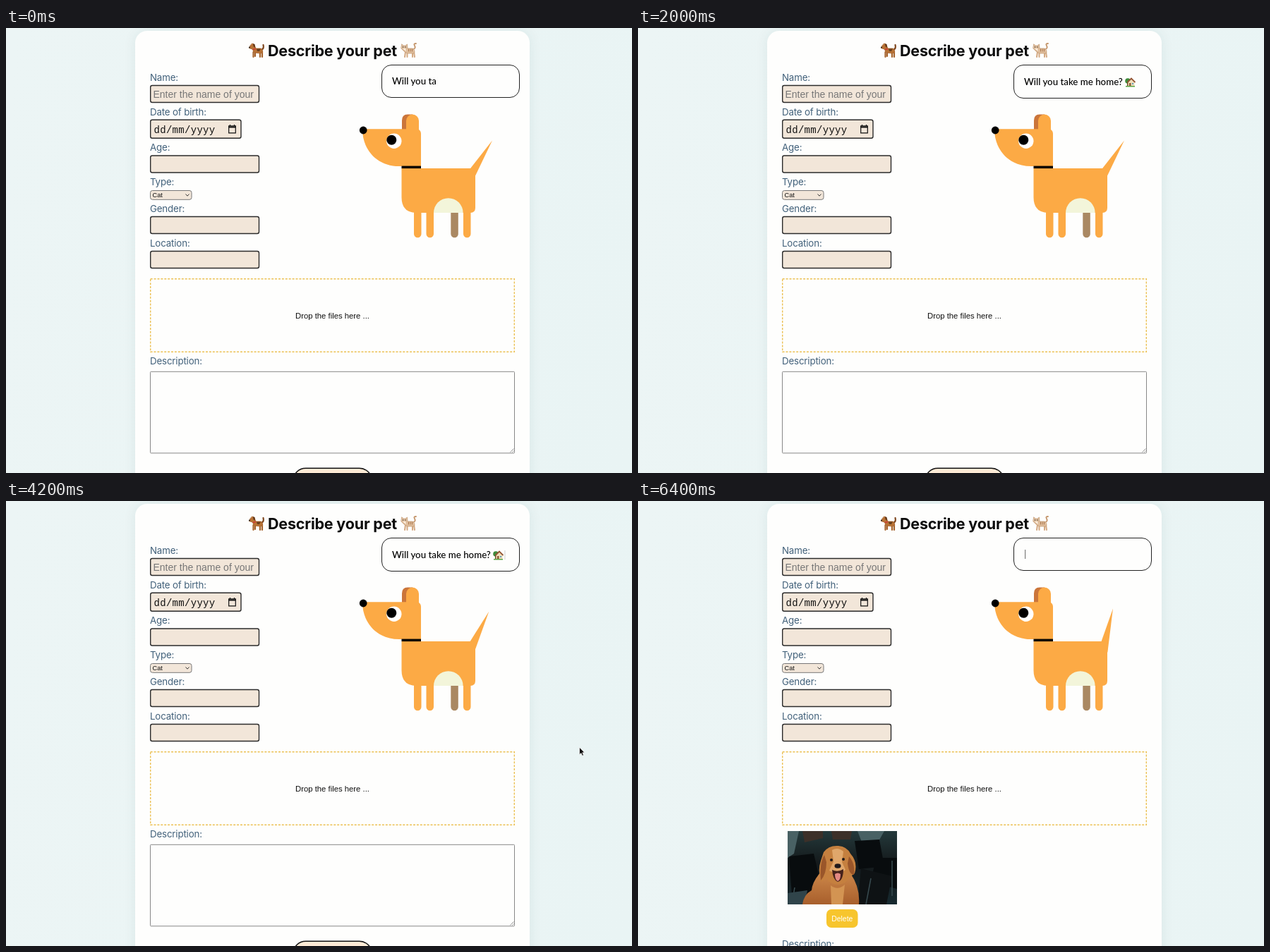
An HTML page for the animation above (6600 ms loop, 887 by 631 pixels).

```html
<!DOCTYPE html>
<html lang="en">
<head>
<meta charset="utf-8">
<title>Describe your pet</title>
<style>
html, body { margin: 0; width: 100%; height: 100%; overflow: hidden; background: #eaf4f4; }
#stage { position: absolute; left: 0; top: 0; width: 887px; height: 631px; overflow: hidden; background: linear-gradient(100deg, #ecf5f5, #e9f4f4); }
.card { position: absolute; left: 183px; top: 4px; width: 559px; height: 680px; border-radius: 17px; background: #fefefd; box-shadow: 0 0 18px rgba(20, 80, 80, .08); }
.scene { position: absolute; left: 0; top: 0; }
.arial { font-family: "Liberation Sans", Arial, sans-serif; }
.title { font: 700 21.5px Inter, sans-serif; letter-spacing: -.2px; fill: #0c0c0c; }
.label { font: 400 13.3px Inter, sans-serif; letter-spacing: -.15px; fill: #41607a; }
.field { fill: #f2e6d9; stroke: #2b2b2b; stroke-width: 1.4; }
.bubble { position: absolute; left: 532px; top: 52px; width: 194px; height: 45px; border: 1px solid #222; border-radius: 14px; background: #fefefd; }
.bubble p { position: absolute; left: 14px; top: 0; margin: 0; white-space: pre; font: 500 13.3px/45px Lato, sans-serif; color: #000; }
.bubble.tall { height: 46px; }
.bubble.tall p { top: 1px; }
.bubble svg { display: none; width: 15px; height: 15px; vertical-align: -3px; }
.bubble.tall svg { display: inline-block; }
</style>
</head>
<body>
<div id="stage">
<div class="card"></div>
<svg class="scene" width="887" height="631" viewBox="0 0 887 631">
  <defs>
    <clipPath id="frame"><rect x="212" y="468" width="155" height="104"/></clipPath>
    <linearGradient id="room" x2="0" y2="1">
      <stop offset="0" stop-color="#24393b"/><stop offset=".45" stop-color="#14191b"/><stop offset="1" stop-color="#172a30"/>
    </linearGradient>
    <linearGradient id="fur" x2="0" y2="1">
      <stop offset="0" stop-color="#cf8a4c"/><stop offset="1" stop-color="#a85f2c"/>
    </linearGradient>
  </defs>

  <text class="title" x="462.5" y="40" text-anchor="middle">Describe your pet</text>
  <g id="dogIcon" fill="none" stroke-linecap="round" stroke-linejoin="round">
    <path d="M350.500 34V41M353 34V40M360 34V41M363 33V41" stroke="#a5632d" stroke-width="2.200"/>
    <path d="M362 31Q366 29 364.500 24" stroke="#7d451d" stroke-width="2.200"/>
    <path d="M349 22L352 24L354 29H361Q364 30 363.500 35L360 36L352 35L349 30L344.500 28.500L346 25Z" fill="#b87235" stroke="#a5632d" stroke-width=".8"/>
    <path d="M350 22L352.500 23L353 28L350.500 26Z" fill="#5f3517"/>
    <path d="M355 29.500H361L359 33H356Z" fill="#69401f"/>
    <path d="M350.500 30.500L353.500 29.500" stroke="#cc3935" stroke-width="1.500"/>
    <circle cx="345" cy="27.500" r="1" fill="#222"/>
  </g>
  <g id="catIcon" fill="none" stroke-linecap="round" stroke-linejoin="round">
    <path d="M566 34L565 41M568.500 35V41M576 34V41M578 34L579 41" stroke="#d4a982" stroke-width="2"/>
    <path d="M577 30Q581 29 579 25Q577 22 581 22" stroke="#c4956b" stroke-width="1.800"/>
    <path d="M561 23L563 25H566L568.500 23L569 29H576Q580 31 578.500 36H569L565 34L560 29Z" fill="#dfbd9b" stroke="#c59d78" stroke-width=".8"/>
    <path d="M570.500 30V33M573 30V33M575.500 30V33" stroke="#a9764d"/>
    <path d="M562 29L566 29L567 33Z" fill="#fff2e4"/>
    <circle cx="562.500" cy="27" r=".7" fill="#333"/><circle cx="566" cy="27" r=".7" fill="#333"/>
  </g>

  <g class="label">
    <text x="204" y="74.500">Name:</text>
    <text x="204" y="123.500">Date of birth:</text>
    <text x="204" y="174">Age:</text>
    <text x="204" y="223">Type:</text>
    <text x="204" y="260.500">Gender:</text>
    <text x="204" y="309.500">Location:</text>
  </g>
  <g class="field">
    <rect x="204.700" y="81.500" width="153.800" height="24" rx="2.500"/>
    <rect x="204.700" y="130.300" width="128.300" height="26" rx="2.500"/>
    <rect x="204.700" y="181" width="153.800" height="24" rx="2.500"/>
    <rect x="204.700" y="267.500" width="153.800" height="24" rx="2.500"/>
    <rect x="204.700" y="316.500" width="153.800" height="24" rx="2.500"/>
    <rect x="204.500" y="230.500" width="58.500" height="12.800" rx="3" stroke="#777" style="stroke:#777;stroke-width:1"/>
  </g>
  <g class="arial">
    <text x="208.500" y="98.500" font-size="14" fill="#777">Enter the name of your</text>
    <text x="207.500" y="240.300" font-size="9.200" fill="#111">Cat</text>
    <text x="462.500" y="411.500" font-size="11.300" text-anchor="middle" fill="#111">Drop the files here ...</text>
  </g>
  <text x="209.500" y="148.500" font-family="'Liberation Mono', monospace" font-size="14" letter-spacing=".3" fill="#111">dd/mm/yyyy</text>
  <path d="M254.500 235.500l2.500 2.700l2.500-2.700" fill="none" stroke="#333"/>
  <path d="M315.700 138.800h9.600v10h-9.600zM317.500 137v2M323.500 137v2" fill="none" stroke="#111" stroke-width="1.200"/>
  <path d="M315.500 139.500h10v2h-10z" fill="#111"/>
  <rect x="204.700" y="355.700" width="515.600" height="103.600" fill="none" stroke="#ecc154" stroke-width="1.400" stroke-dasharray="3 1.900"/>

  <g id="photo">
    <g clip-path="url(#frame)">
      <rect x="212" y="468" width="155" height="104" fill="url(#room)"/>
      <path d="M212 468H228L221 500L212 506ZM311 468H349L340 484L318 486Z" fill="#496164"/>
      <path d="M233 468H262V478L236 484ZM274 468H303L301 480H276Z" fill="#3c3029"/>
      <path d="M214 504L249 500L257 534L248 559H218ZM307 482L342 480L349 518L313 522ZM337 506H367V550L330 540Z" fill="#080c0e"/>
      <path d="M316 521L360 532L352 572H311Z" fill="#0e1214"/>
      <path d="M222 548L218 572M250 547L253 572M330 535L323 572M360 510V560" stroke="#384b50" stroke-width="1.500"/>
      <path d="M212 556L240 552L236 572H212Z" fill="#30444a"/>
      <path d="M262 523Q247 538 246 552Q235 558 233 572H313Q315 548 301 528Z" fill="url(#fur)"/>
      <path d="M263 498Q270 488 284 489Q296 490 301 500Q312 512 307 528L299 534Q295 543 283 544Q271 543 267 535L260 540Q254 525 259 510Z" fill="#c5803f"/>
      <path d="M264 502Q257 513 259 538Q267 529 267 512ZM299 504Q308 514 306 530Q299 530 297 514Z" fill="#9a562a"/>
      <path d="M275 495Q283 490 291 497L289 512L294 523L283 530L271 524L277 511Z" fill="#e0a76b"/>
      <path d="M275 523Q283 527 291 522Q291 538 283 540Q276 537 275 523Z" fill="#46221b"/>
      <path d="M279 529Q283 526 287 529Q287 538 283 539Q279 537 279 529Z" fill="#e38883"/>
      <ellipse cx="283" cy="517.500" rx="4.500" ry="3.200" fill="#20191a"/>
      <circle cx="274" cy="509" r="2" fill="#20191a"/><circle cx="291" cy="508" r="2" fill="#20191a"/>
      <path d="M273 545Q283 553 293 544L290 572H274Z" fill="#d39452"/>
    </g>
    <rect x="267" y="579" width="44.500" height="26" rx="7" fill="#f7c52d"/>
    <text class="arial" x="289.300" y="595.800" font-size="10.400" text-anchor="middle" fill="#fff">Delete</text>
  </g>

  <g id="lower">
    <text class="label" x="204" y="477">Description:</text>
    <rect x="204.500" y="487.300" width="516" height="115.500" rx="1" fill="#fefefd" stroke="#888"/>
    <path d="M714.500 601.500l5-5M717.500 601.500l2-2" stroke="#777" stroke-width=".8"/>
    <rect x="406.700" y="624.300" width="112" height="40" rx="18" fill="#fdead5" stroke="#111" stroke-width="1.500"/>
  </g>

  <g id="dog" fill="#fcaa45">
    <path id="tail" d="M0-54L-6 8H7.500Z"/>
    <path d="M561 144V131Q561 122.500 569 122.500H576V144Z" fill="#cb753a"/>
    <path d="M567 150V131.500A9 9 0 0 1 585 131.500V144Q588 146 588 150V196H557C526 196 505 173 505 143.300H567Z"/>
    <path d="M560.500 199H662Q665 199 665 202V255Q665 262 658 262H582Q560.500 262 560.500 240Z"/>
    <path d="M606 262A20.800 20.800 0 0 1 647.600 262Z" fill="#f3f5da"/>
    <path d="M578 255h10.500v37a5.250 5.250 0 0 1-10.500 0zM595.500 255h10.500v37a5.250 5.250 0 0 1-10.500 0zM648 255h10.500v37a5.250 5.250 0 0 1-10.500 0z"/>
    <path d="M630.300 262h10.500v30a5.250 5.250 0 0 1-10.500 0z" fill="#aa8862"/>
    <rect x="560.500" y="195.600" width="27.500" height="3.500" fill="#000"/>
    <circle cx="506.200" cy="145" r="5.400" fill="#000"/>
    <circle cx="549.800" cy="160.300" r="10.700" fill="#fff"/>
    <circle cx="546.300" cy="158.700" r="7" fill="#000"/>
  </g>
</svg>

<div class="bubble" id="bubble"><p><span id="words"></span><svg viewBox="0 0 15 15"><circle cx="4" cy="6" r="3.800" fill="#3f8b3b"/><path d="M3 8h2v5H3z" fill="#76502d"/><path d="M4.500 7.500L9 3.500L13.500 7.500V13H4.500Z" fill="#f0dfba"/><path d="M3.500 8L9 2.500L14.500 8" fill="none" stroke="#925333" stroke-width="1.800"/><path d="M6 9h2.500v4H6z" fill="#8d5a34"/><path d="M10 9h2v2h-2z" fill="#609ec0"/><path d="M1 13h13v1.500H1z" fill="#59a343"/></svg><span id="caret">|</span></p></div>

<svg class="scene" width="887" height="631" viewBox="0 0 887 631">
  <path id="pointer" d="M0 0V10.500L2.400 8.300L4 12L5.900 11.200L4.300 7.600H7.400Z" fill="#111" stroke="#fff" stroke-width=".7"/>
</svg>
</div>
<script>
const LOOP = 6600, STEP = 200;
const LINE = "Will you take me home? ";
const FULL = LINE.length + 1; // the house counts as one character
const $ = id => document.getElementById(id);
const [tail, photo, lower, bubble, words, caret, pointer] =
  ["tail", "photo", "lower", "bubble", "words", "caret", "pointer"].map($);
const clamp = x => Math.min(1, Math.max(0, x));
const smooth = x => x * x * (3 - 2 * x);
const wave = turns => (1 - Math.cos(2 * Math.PI * turns)) / 2;
const show = (el, on) => { el.style.display = on ? "" : "none"; };

function typed(t) {
  return t < 4750
    ? Math.min(FULL, 11 + Math.floor(t / 153))
    : Math.max(0, FULL - Math.ceil((t - 4750) / 53.5));
}

function draw(t) {
  const n = typed(t);
  words.textContent = LINE.slice(0, n);
  bubble.classList.toggle("tall", n === FULL);
  caret.style.opacity = wave(t / 1025 + .04);

  const angle = 8.5 + 24 * wave((t - 3600) / 1010 + .07);
  tail.setAttribute("transform", `translate(660 205) rotate(${angle})`);

  const dropped = t >= 5200;
  show(photo, dropped);
  lower.setAttribute("transform", `translate(0 ${dropped ? 156 : 0})`);

  const p = smooth(clamp((t - 4000) / 800));
  show(pointer, t >= 4000 && t < 6200);
  pointer.setAttribute("transform", `translate(${885 - 464 * p} ${340 + 59 * p})`);
}

const start = performance.now();
function tick() {
  const t = (performance.now() - start) % LOOP;
  draw(Math.floor(t / STEP) * STEP);
  requestAnimationFrame(tick);
}
tick();
</script>
</body>
</html>
```
